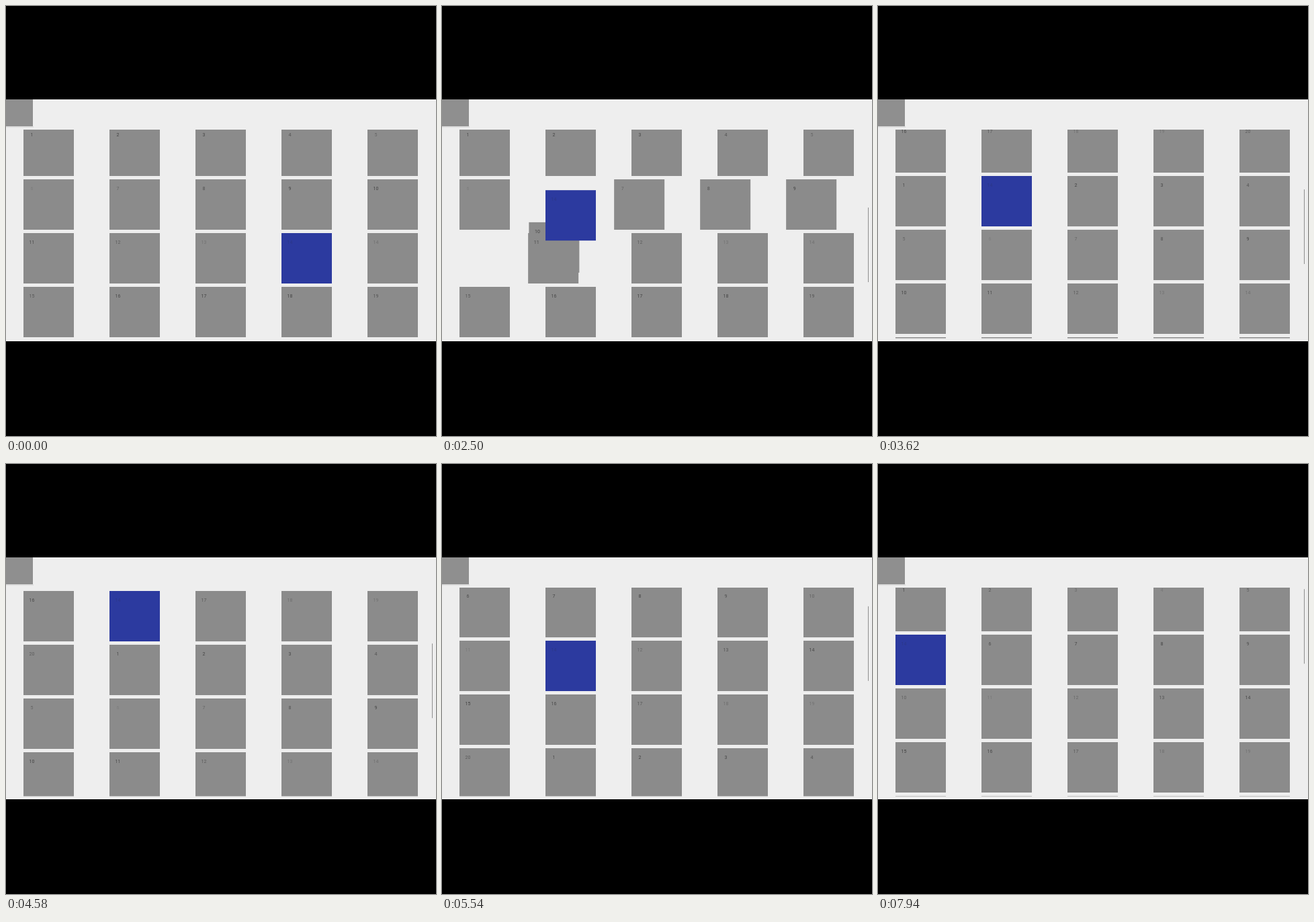
Animation, 640 px wide and 640 px high, one loop 8000 ms. Source, as an HTML page:

```html
<!DOCTYPE html>
<html lang="en">
<head>
<meta charset="utf-8">
<title>Drag and drop grid</title>
<style>
  html, body { margin: 0; width: 100%; height: 100%; overflow: hidden; background: #000; }
  svg { display: block; width: 100vw; height: 100vh; }
  text { font: 7px Roboto, Arial, sans-serif; text-anchor: middle; fill: #2a2a2a; }
</style>
</head>
<body>
<svg viewBox="0 0 640 640">
  <defs><clipPath id="list"><rect y="184" width="640" height="310.5"/></clipPath></defs>
  <rect width="640" height="640" fill="#000"/>
  <rect y="139" width="640" height="360" fill="#eee"/>
  <rect y="179" width="41" height="2" fill="#dedede"/>
  <rect y="139" width="40" height="40" fill="#8f8f8f"/>
  <g id="tiles" clip-path="url(#list)"></g>
  <rect id="bar" x="634" width="1" height="111" fill="#8f8f8f"/>
</svg>
<script>
const LOOP = 8000, FRAME = 80, MOVE_MS = 300, COLS = 5;
const GRAY = '#8b8b8b', BLUE = '#2c3a9f', PINK = '#ff4183';
const LEFT = -1, UP = -COLS, FIRST_SLOT = 8;

// Each move shifts the dragged tile to another slot and may scroll the list down.
const moves = [
  { at: 700, step: LEFT, scroll: 0 },
  { at: 1100, step: LEFT, scroll: 0 },
  { at: 2376, step: UP, scroll: 0 },
  { at: 3200, step: UP, scroll: 75 },
  { at: 4000, step: UP, scroll: 16 },
  { at: 5200, step: UP, scroll: 154 },
  { at: 6340, step: LEFT, scroll: 0 },
  { at: 7640, step: UP, scroll: 71 },
];

const clamp = p => Math.max(0, Math.min(1, p));
const easeOut = p => 1 - (1 - clamp(p)) ** 3;
const progress = (move, t) => easeOut((t - move.at) / MOVE_MS);

function slotPos(i) {
  const row = Math.floor(i / COLS);
  return [26 + (i - row * COLS) * 128, 258 + row * 80];
}

// Eases through every move; slotOf tells the tile's slot while the dragged one is at `hole`.
function tilePos(slotOf, t) {
  let hole = FIRST_SLOT, [x, y] = slotPos(slotOf(hole));
  for (const move of moves) {
    const a = slotPos(slotOf(hole)), b = slotPos(slotOf(hole += move.step));
    const p = progress(move, t);
    x += (b[0] - a[0]) * p;
    y += (b[1] - a[1]) * p + move.scroll * p;
  }
  return [x, y];
}

const layer = document.getElementById('tiles');
const bar = document.getElementById('bar');

function add(tag, attrs, parent) {
  const el = document.createElementNS('http://www.w3.org/2000/svg', tag);
  for (const name in attrs) el.setAttribute(name, attrs[name]);
  return parent.appendChild(el);
}

function makeTile(label, color, opacity, slotOf) {
  const el = add('g', {}, layer);
  const box = add('rect', { width: 75, height: 75, fill: color }, el);
  add('text', { x: 12.5, y: 16, opacity }, el).textContent = label;
  return { el, box, slotOf };
}

const tiles = [];
for (let k = -30; k < 15; k++) {
  const faint = Math.abs(Math.sin(k * 12.9898)) * 0.6 + 0.15;
  tiles.push(makeTile((k + 45) % 20 + 1, GRAY, faint, hole => k < hole ? k : k + 1));
}
const dragged = makeTile(14, BLUE, 0.2, hole => hole);
tiles.push(dragged);

// The scrollbar shows on touch, fades out, and returns with the next drag.
function barOpacity(t) {
  if (t < 500) return 0;
  return t < 2260 ? 1 - clamp((t - 1060) / 560) : 1;
}

function draw(time) {
  // Refresh once per 80 ms, 20 ms after each full step.
  const t = Math.max(0, Math.floor((time - 20) / FRAME) * FRAME + 20);
  for (const { el, slotOf } of tiles) {
    const [x, y] = tilePos(slotOf, t);
    el.setAttribute('transform', `translate(${x.toFixed(2)} ${y.toFixed(2)})`);
  }
  dragged.box.setAttribute('fill', t >= 6580 && t < 7140 ? PINK : BLUE);

  const scroll = moves.reduce((sum, move) => sum + move.scroll * progress(move, t), 0);
  bar.setAttribute('y', (300 - scroll * 0.36).toFixed(2));
  bar.setAttribute('opacity', barOpacity(t));
}

const begin = performance.now();
function tick() {
  draw((performance.now() - begin) % LOOP);
  requestAnimationFrame(tick);
}
tick();
</script>
</body>
</html>
```
